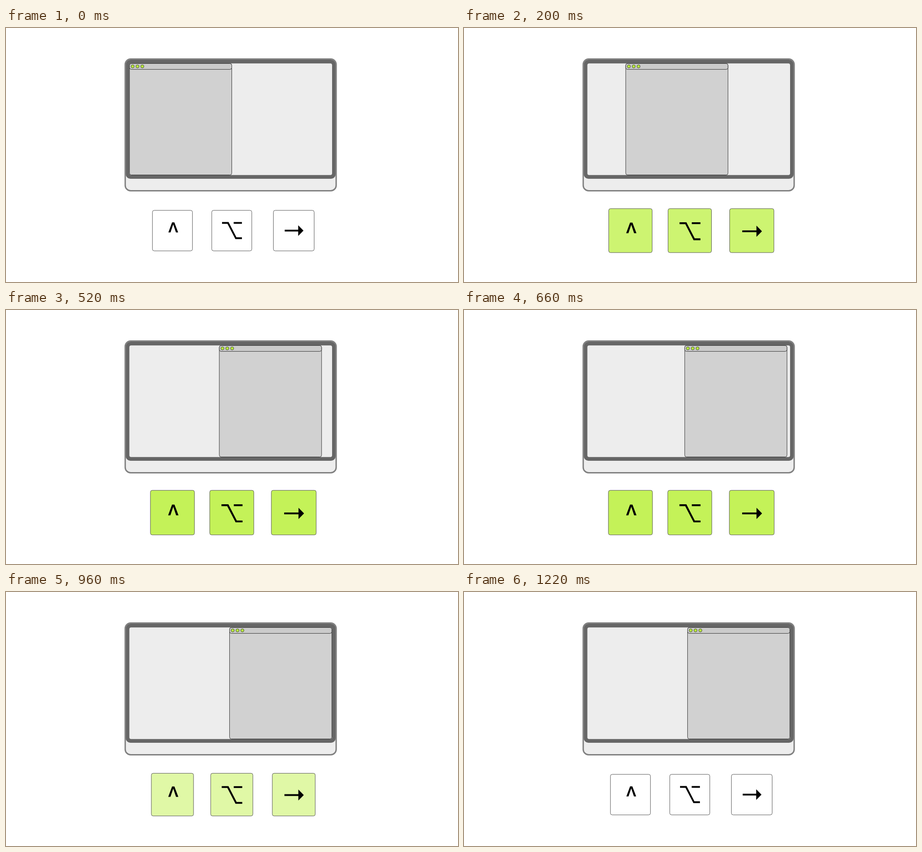
Write an HTML page with a canvas that moves like this. It is 998 by 561 pixels and loops after 1.78 s.

```html
<!DOCTYPE html>
<html lang="en">
<head>
<meta charset="utf-8">
<title>Move window right</title>
<style>
  html, body { margin: 0; width: 100%; height: 100%; overflow: hidden; background: #fff; }
  canvas { display: block; }
</style>
</head>
<body>
<canvas id="stage" width="998" height="561"></canvas>
<script>
const ctx = document.getElementById('stage').getContext('2d');
const LOOP = 1780, STEP = 20;
const SLIDE = 840, PRESS = 360, RELEASE_AT = 860;
const TRAVEL = 220.9;

const mix = (a, b, k) => a + (b - a) * k;

// cubic-bezier(0.25, 0.1, 0.25, 1), solved by bisection
function ease(p) {
  if (p <= 0) return 0;
  if (p >= 1) return 1;
  const curve = (a, b, s) => 3 * a * s * (1 - s) ** 2 + 3 * b * s * s * (1 - s) + s ** 3;
  let low = 0, high = 1;
  for (let i = 0; i < 30; i++) {
    const mid = (low + high) / 2;
    if (curve(0.25, 0.25, mid) < p) low = mid; else high = mid;
  }
  return curve(0.1, 1, low);
}

function box(x, y, w, h, r, fill, stroke, width = 1) {
  ctx.beginPath();
  ctx.roundRect(x, y, w, h, r);
  ctx.fillStyle = fill;
  ctx.fill();
  if (!stroke) return;
  ctx.strokeStyle = stroke;
  ctx.lineWidth = width;
  ctx.stroke();
}

function trace(points) {
  ctx.beginPath();
  points.forEach(([x, y]) => ctx.lineTo(x, y));
}

function fillShape(points) {
  trace(points);
  ctx.fill();
}

function strokeLine(points) {
  trace(points);
  ctx.stroke();
}

// Glyphs are drawn around the centre of their key.
function control() {
  fillShape([[-0.8, -18.3], [4.2, -18.3], [12.6, 4], [7.7, 4],
             [1.7, -13.8], [-4.3, 4], [-9, 4]]);
}

function option() {
  strokeLine([[-21.5, -17], [-8.3, -17], [9.2, 16.8], [22.4, 16.8]]);
  strokeLine([[4.2, -17], [22.4, -17]]);
}

function arrow() {
  strokeLine([[-20, 0], [11, 0]]);
  fillShape([[9.8, -11.8], [21.4, 0], [9.8, 11.8]]);
}

const keys = [
  { x: 367.5, w: 88.4, glyph: control },
  { x: 498.5, w: 88.4, glyph: option },
  { x: 635.4, w: 90, glyph: arrow }
];
const KEY_Y = 447.5, KEY_H = 89.5;

function drawKey({ x, w, glyph }, k) {
  const scale = mix(1, 1.1, k);
  const color = `rgb(${mix(255, 196, k)}, ${mix(255, 242, k)}, ${mix(255, 88, k)})`;
  box(x - w * scale / 2, KEY_Y - KEY_H * scale / 2, w * scale, KEY_H * scale,
      4 , color, '#555');
  ctx.save();
  ctx.translate(x, KEY_Y + 1.7 * k);
  ctx.scale(mix(1, 1.06, k), mix(1, 1.06, k));
  ctx.fillStyle = ctx.strokeStyle = '#000';
  ctx.lineWidth = 3.9;
  glyph();
  ctx.restore();
}

function drawMonitor() {
  box(263.2, 68.6, 465.8, 290.8, 12, '#ededed', '#808080', 3);
  box(264.5, 70, 463.3, 263, [11, 11, 10, 10], '#666');
  box(272.4, 78.2, 447.6, 246.6, 4, '#ededed');
}

function drawWindow(x) {
  box(x, 78.5, 225.8, 246, 4, '#d1d1d1', '#333');
  box(x, 78.5, 225.8, 12.9, 4, '#cbcbcb', '#333');
  for (let i = 0; i < 3; i++) {
    ctx.beginPath();
    ctx.arc(x + 6.9 + i * 10.7, 84.8, 3.5, 0, Math.PI * 2);
    ctx.fillStyle = '#b9ec3d';
    ctx.fill();
    ctx.strokeStyle = '#333';
    ctx.lineWidth = 0.9;
    ctx.stroke();
  }
}

function draw(t) {
  const pressed = ease(t / PRESS) - ease((t - RELEASE_AT) / PRESS);
  ctx.fillStyle = '#fff';
  ctx.fillRect(0, 0, 998, 561);
  drawMonitor();
  drawWindow(272.7 + TRAVEL * ease(t / SLIDE));
  keys.forEach(key => drawKey(key, pressed));
}

const start = performance.now();
function tick() {
  const t = (performance.now() - start) % LOOP;
  draw(Math.floor(t / STEP) * STEP);
  requestAnimationFrame(tick);
}
tick();
</script>
</body>
</html>
```
